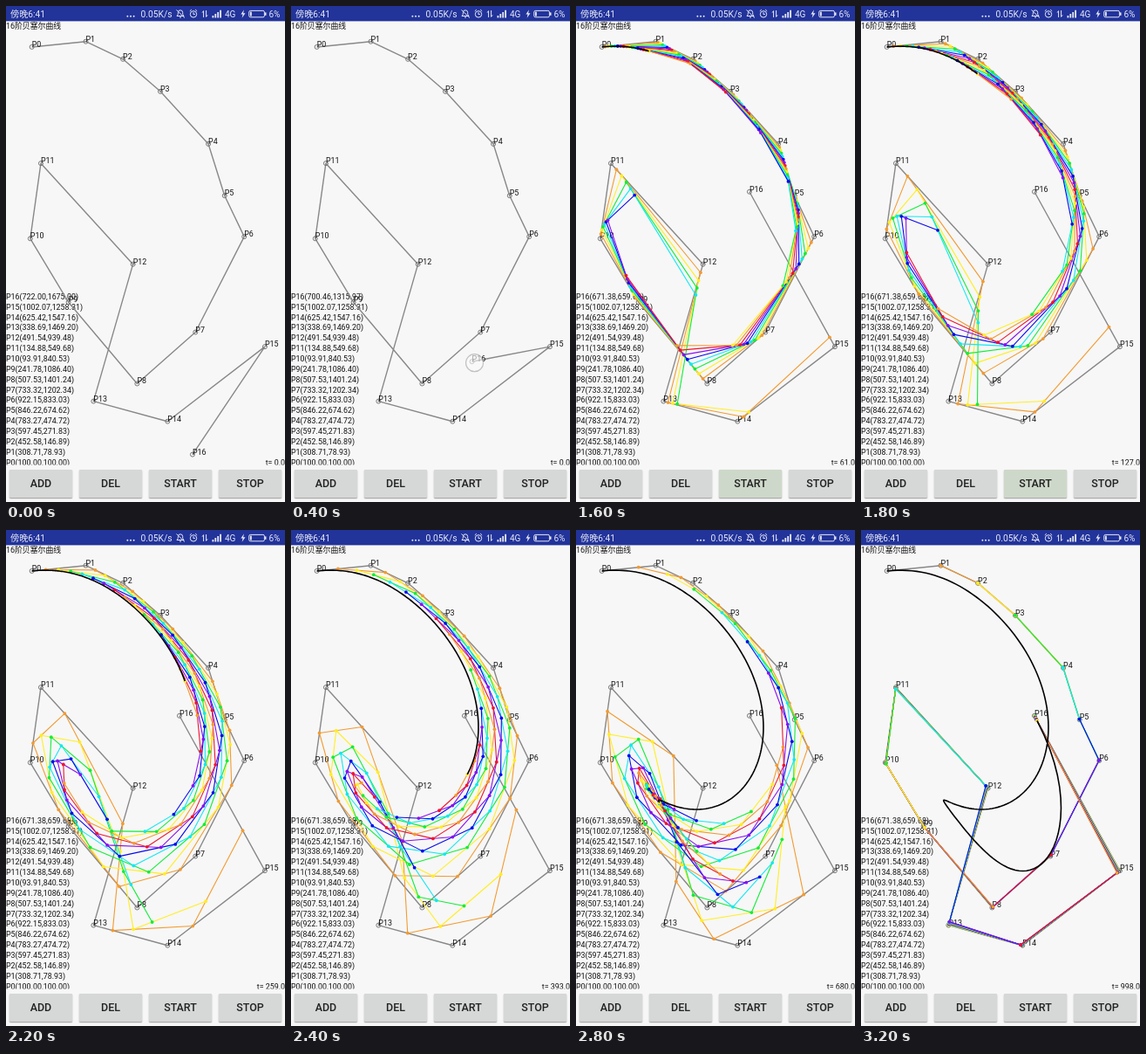
Write an HTML page with a canvas that moves like this. It is 320 px wide and 568 px high and loops after 3.4 s.

```html
<!DOCTYPE html>
<html lang="zh">
<head>
<meta charset="utf-8">
<title>Bezier</title>
<style>
  html, body { margin: 0; width: 100%; height: 100%; overflow: hidden; background: #f7f7f7; }
  body { position: relative; font-family: Roboto, "Noto Sans CJK SC", "Noto Sans CJK", sans-serif; }
  canvas, .status { position: absolute; left: 0; top: 0; display: block; }
  canvas { width: 320px; height: 568px; }
  .btn {
    position: absolute; top: 530.8px; width: 72.8px; height: 32.2px;
    border-radius: 1px; background: #d6d7d7; color: #222;
    box-shadow: 0 1px 1.5px rgba(0, 0, 0, .38);
    font-size: 12.44px; font-weight: 500; line-height: 32.6px; text-align: center;
  }
  .btn.pressed { background: #ced8ca; }
</style>
</head>
<body>
<canvas id="view"></canvas>

<svg class="status" width="320" height="18" viewBox="0 0 320 18" fill="#e4e7f5" font-size="10">
  <rect width="320" height="17.4" fill="#22339a"/>
  <text x="5" y="12.8" font-size="10.2">傍晚6:41</text>
  <circle cx="139.4" cy="11.8" r="1"/><circle cx="143" cy="11.8" r="1"/><circle cx="146.6" cy="11.8" r="1"/>
  <text x="154.5" y="12.8" font-size="10.3">0.05K/s</text>
  <g fill="none" stroke="#e4e7f5" stroke-width="1">
    <path d="M196 11.5h8l-1.3-2V7.5a2.7 2.7 0 0 0-5.4 0v2zM199 13h2M195.5 4.5l9.5 9"/>
    <circle cx="215" cy="9.4" r="3.7"/>
    <path d="M215 7.2v2.4h1.8M210.8 5.9l2-1.8M219.2 5.9l-2-1.8"/>
    <path d="M226.6 13V5.6l-1.5 2M229.6 5v7.4l1.5-2"/>
    <rect x="278.8" y="5.4" width="17.6" height="7.4" rx="1.5"/>
  </g>
  <path d="M236.5 11h1.8v2.4h-1.8zM239.4 9h1.8v4.4h-1.8zM242.3 7h1.8v6.4h-1.8zM245.2 4.8h1.8v8.6h-1.8z"/>
  <text x="251" y="12.9">4G</text>
  <path d="M273 4.2l-3.6 5.4h2.2l-1 4.2 3.9-5.6h-2.4z"/>
  <rect x="280" y="6.6" width="1.8" height="5"/>
  <rect x="297" y="7.4" width="1.5" height="3.4"/>
  <text x="301.5" y="12.9">6%</text>
</svg>

<div class="btn" style="left:3.6px">ADD</div>
<div class="btn" style="left:83.6px">DEL</div>
<div class="btn" id="start" style="left:163.6px">START</div>
<div class="btn" style="left:243.6px">STOP</div>

<script>
const LOOP = 3400, STEP = 200;
const SCALE = 320 / 1080, TOP = 17.3, BOTTOM = 525.5, LINE = 11.85;
const FONT = '8.89px Roboto, "Noto Sans CJK SC", "Noto Sans CJK", sans-serif';
const RAINBOW = ['#f0142c', '#f39a30', '#ffee20', '#10ee38', '#10e8f4', '#0808f0', '#8b10f0'];

const FIXED = [
  [100, 100], [308.71, 78.93], [452.58, 146.89], [597.45, 271.83],
  [783.27, 474.72], [846.22, 674.62], [922.15, 833.03], [733.32, 1202.34],
  [507.53, 1401.24], [241.78, 1086.40], [93.91, 840.53], [134.88, 549.68],
  [491.54, 939.48], [338.69, 1469.20], [625.42, 1547.16], [1002.07, 1258.31]
];
const DRAG_FROM = [722, 1675], DRAG_TO = [660.80, 655.04], DROP = [671.38, 659.68];
const DRAG_END = 5, RUN = 8;
// progress in thousandths at key steps
const PROGRESS = [[8, 61], [9, 127], [11, 259], [12, 393], [14, 680], [16, 998]];

const canvas = document.getElementById('view');
const start = document.getElementById('start');
const ctx = canvas.getContext('2d');
const ratio = Math.max(1, window.devicePixelRatio || 1);
canvas.width = 320 * ratio;
canvas.height = 568 * ratio;
ctx.scale(ratio, ratio);

const mix = (a, b, t) => [a[0] + (b[0] - a[0]) * t, a[1] + (b[1] - a[1]) * t];
const toScreen = p => [p[0] * SCALE, p[1] * SCALE + TOP];
const reduce = (pts, t) => pts.slice(1).map((p, i) => mix(pts[i], p, t));
const ease = t => t * t * (3 - 2 * t);

function lastPoint(step) {
  return step > DRAG_END ? DROP : mix(DRAG_FROM, DRAG_TO, ease(step / DRAG_END));
}

function progress(step) {
  if (step < RUN) return 0;
  const i = Math.max(1, PROGRESS.findIndex(k => k[0] >= step));
  const [s0, v0] = PROGRESS[i - 1], [s1, v1] = PROGRESS[i];
  return Math.round(v0 + (v1 - v0) * (step - s0) / (s1 - s0));
}

function bezier(pts, t) {
  while (pts.length > 1) pts = reduce(pts, t);
  return pts[0];
}

function polyline(pts, color, width) {
  ctx.beginPath();
  pts.forEach(p => ctx.lineTo(p[0], p[1]));
  ctx.strokeStyle = color;
  ctx.lineWidth = width;
  ctx.stroke();
}

function disc(p, r) {
  ctx.beginPath();
  ctx.arc(p[0], p[1], r, 0, 2 * Math.PI);
}

function drawText(raw, value) {
  ctx.fillStyle = '#111';
  ctx.fillText('16阶贝塞尔曲线', 0, 26.3);
  raw.forEach((p, i) => {
    ctx.fillText(`P${i}(${p[0].toFixed(2)},${p[1].toFixed(2)})`, 0, BOTTOM - i * LINE);
  });
  ctx.textAlign = 'right';
  ctx.fillText(`t= ${value.toFixed(1)}`, 320, BOTTOM);
  ctx.textAlign = 'left';
}

function drawControls(pts) {
  polyline(pts, '#888', 1.4);
  pts.forEach((p, i) => {
    disc(p, 2.5);
    ctx.strokeStyle = '#777';
    ctx.lineWidth = 1;
    ctx.stroke();
    ctx.fillStyle = '#111';
    ctx.fillText('P' + i, p[0], p[1]);
  });
}

function drawLayers(pts, t) {
  let layer = pts;
  for (let level = 1; level < pts.length; level++) {
    layer = reduce(layer, t);
    const color = RAINBOW[level % 7];
    polyline(layer, color, 1.1);
    ctx.fillStyle = color;
    layer.forEach(p => { disc(p, 1.9); ctx.fill(); });
  }
  const curve = [];
  for (let i = 0; i <= 160; i++) curve.push(bezier(pts, t * i / 160));
  polyline(curve, '#000', 1.6);
}

function drawTouch(p) {
  disc([p[0] + 3, p[1] + 1.5], 10);
  ctx.fillStyle = 'rgba(250,250,250,.6)';
  ctx.fill();
  ctx.strokeStyle = 'rgba(170,170,170,.7)';
  ctx.lineWidth = 1.2;
  ctx.stroke();
}

function draw(step) {
  const raw = [...FIXED, lastPoint(step)];
  const pts = raw.map(toScreen);
  const value = progress(step);
  ctx.clearRect(0, 0, 320, 568);
  ctx.save();
  ctx.beginPath();
  ctx.rect(0, TOP, 320, BOTTOM - TOP);
  ctx.clip();
  ctx.font = FONT;
  ctx.lineJoin = 'round';
  drawText(raw, value);
  drawControls(pts);
  if (step >= RUN) drawLayers(pts, value / 1000);
  if (step > 0 && step <= DRAG_END) drawTouch(pts[16]);
  ctx.restore();
  start.classList.toggle('pressed', step >= 7 && step <= 9);
}

const origin = performance.now();
function tick() {
  draw(Math.floor(((performance.now() - origin) % LOOP) / STEP));
  requestAnimationFrame(tick);
}
tick();
</script>
</body>
</html>
```
